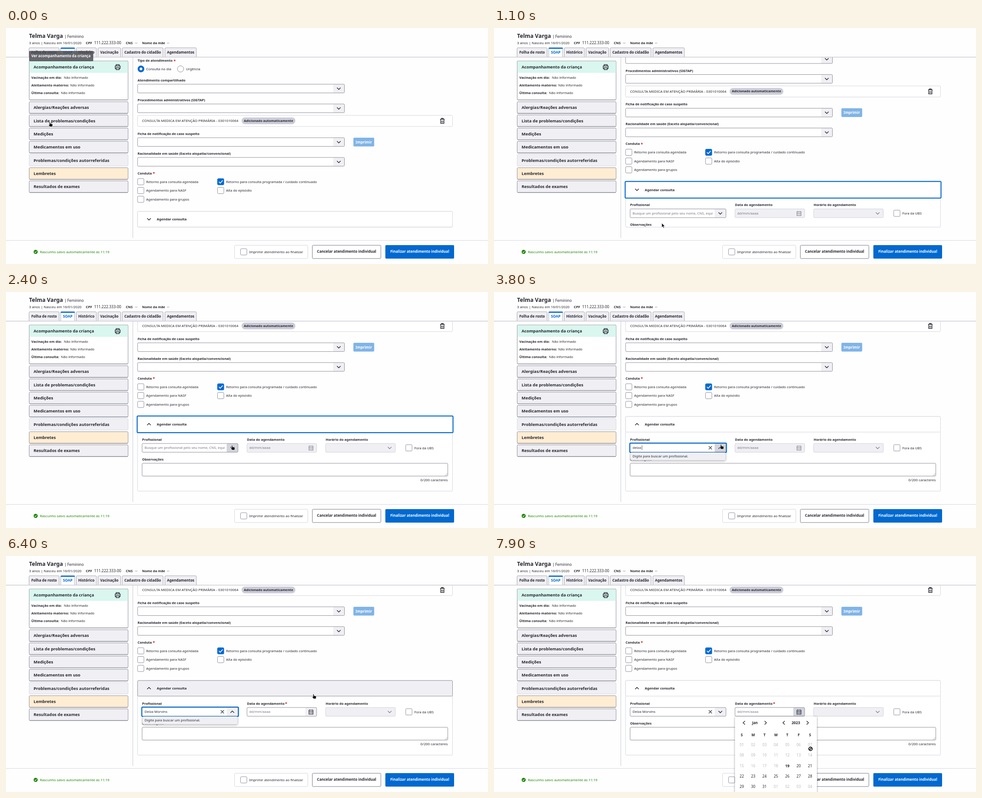
An HTML page that plays this animation: 1066 px wide and 525 px high, repeating every 8000 ms.

```html
<!DOCTYPE html>
<html lang="pt-BR">
<head>
<meta charset="utf-8">
<title>Atendimento</title>
<style>
html, body { margin: 0; width: 100%; height: 100%; overflow: hidden; background: #fefefe; }
svg { display: block; width: 100vw; height: 100vh; font-family: "Noto Sans", "Open Sans", sans-serif; }
.pop { filter: drop-shadow(0 1px 2px #0006); }
</style>
</head>
<body>
<svg id="stage" viewBox="0 0 1066 525"></svg>
<script>
const INK = '#25262e', LINE = '#8f909b', SOFT = '#d5d6e0', PALE = '#f0f0f4', BLUE = '#0069d0', MUTED = '#757681', RED = '#c8201d';
const LOOP = 8000, STEP = 100, SHIFT = 131;
const PRO = 'Delza Morvins', QUERY = 'delza';
const KEY_TIMES = [3200, 3400, 3500, 3600, 3800];

// time, x, y of the tip, pointer shape
const PATH = [
  [0, 97, 209, 'hand'], [100, 140, 250, 'arrow'], [500, 350, 461, 'arrow'], [600, 364, 458, 'arrow'],
  [700, 366, 443, 'arrow'], [800, 368, 435, 'hand'], [1000, 370, 434, 'hand'], [1100, 371, 434, 'arrow'],
  [1300, 372, 433, 'arrow'], [1800, 425, 365, 'arrow'], [2400, 500, 341, 'hand'], [2600, 502, 339, 'hand'],
  [6200, 502, 339, 'hand'], [6300, 600, 318, 'arrow'], [6400, 680, 307, 'hand'], [6600, 684, 322, 'arrow'],
  [6900, 677, 373, 'arrow'], [7100, 674, 346, 'hand'], [7700, 674, 346, 'hand'], [7800, 690, 400, 'arrow'], [7900, 700, 429, 'no']
];

const rect = (x, y, w, h, fill = '#fff', stroke = 'none', more = '') =>
  `<rect x="${x}" y="${y}" width="${w}" height="${h}" rx="2" fill="${fill}" stroke="${stroke}" ${more}/>`;
const path = (d, stroke = INK, width = 1.3, fill = 'none', more = '') =>
  `<path d="${d}" stroke="${stroke}" stroke-width="${width}" fill="${fill}" ${more}/>`;
const circle = (x, y, r, fill, stroke = 'none') =>
  `<circle cx="${x}" cy="${y}" r="${r}" fill="${fill}" stroke="${stroke}"/>`;
// y is the middle of the capitals
const text = (x, y, s, size = 7.5, color = INK, more = '') =>
  `<text x="${x}" y="${y + size * .357}" font-size="${size}" fill="${color}" ${more}>${s}</text>`;
const bold = (x, y, s, size = 7.45, color = INK, more = '') => text(x, y, s, size, color, 'font-weight="700" ' + more);
const MID = 'text-anchor="middle"';
const star = (x, y) => bold(x, y + 1, '*', 9, RED);

const chevron = (x, y, turn = 0, color = INK) =>
  path('M-4-2L0 2L4-2', color, 1.4, 'none', `transform="translate(${x} ${y}) rotate(${turn})"`);

function select(x, y, w, { off, open, hover } = {}) {
  const edge = off ? '#cfd0da' : LINE, right = x + w;
  return rect(x, y, w, 19.4, off ? PALE : '#fff') +
    (off ? '' : rect(right - 25, y, 25, 19.4, hover ? '#d3d4dd' : PALE)) +
    rect(x, y, w, 19.4, 'none', edge) +
    chevron(right - 12.5, y + 9.7, open ? 180 : 0, off ? '#85868f' : INK);
}

function check(x, y, label, on) {
  return rect(x, y - 7, 14, 14, on ? BLUE : '#fff', on ? BLUE : LINE) +
    (on ? path(`M${x + 3} ${y}l3 3l5.5-6`, '#fff', 1.7) : '') + text(x + 19, y + .3, label);
}

function calendarIcon(x, y, color) {
  return path(`M${x - 4.5} ${y - 4}h9v9h-9zM${x - 4.5} ${y - 1}h9M${x - 2.5} ${y - 5.5}v2M${x + 2.5} ${y - 5.5}v2`, color, 1.2) +
    path(`M${x - 2.8} ${y + 1}h6M${x - 2.8} ${y + 3}h6`, color, 1.1, 'none', 'stroke-dasharray="1.3 1"');
}

function header() {
  const tabs = [['Folha de rosto', 51, 66.5], ['SOAP', 121, 31], ['Histórico', 155.5, 44.5], ['Vacinação', 203.5, 50],
    ['Cadastro do cidadão', 257, 90.5], ['Agendamentos', 351.5, 69.5]];
  return path('M0 64.7H1066', '#cccdd6', 1.6) +
    bold(51, 18, 'Telma Varga', 12.2) + text(129, 19, '|', 8.3) + text(135.5, 19, 'Feminino', 8.35) +
    text(51, 33, '3 anos | Nasceu em 16/01/2020', 7.75) +
    bold(176.5, 33, 'CPF', 7.7) + text(195, 33, '111.222.333-00', 8.38) +
    bold(265, 33, 'CNS', 7.6) + text(285, 33, '—', 6) + bold(301, 33, 'Nome da mãe', 7.35) + text(355.5, 33, '—', 6) +
    tabs.map(([s, x, w], i) => {
      const on = i == 1;
      return path(`M${x} 64V46q0-2 2-2h${w - 4}q2 0 2 2V64`, '#a4a5af', 1, on ? '#fff' : PALE) +
        (on ? path(`M${x} 45h${w}`, BLUE, 2.6) : '') +
        bold(x + w / 2, 54, s, 8, on ? BLUE : INK, MID);
    }).join('');
}

function side() {
  const rows = ['Alergias/Reações adversas', 'Lista de problemas/condições', 'Medições', 'Medicamentos em uso',
    'Problemas/condições autorreferidas', 'Lembretes', 'Resultados de exames'];
  const facts = [['Vacinação em dia:', 128], ['Aleitamento materno:', 142], ['Última consulta:', 121.5]];
  return path('M280.5 65V467', '#c9cad5', 1) +
    rect(51.3, 74.5, 218.7, 86.5, '#b4b5bf') + rect(51.3, 73.3, 218.7, 86.5, '#fff', LINE) +
    rect(51.8, 73.8, 217.7, 26, '#d9f6ef') + bold(61, 87, 'Acompanhamento da criança', 9.15) +
    path('M243.5 84.5v-3h7v3M243.5 90h-2v-5.5h11v5.5h-2M243.5 88.5h7v4h-7z', INK, 1.3) +
    facts.map(([s, x], i) => bold(56, 110.5 + i * 16.7, s, 7.5) + text(x, 110.5 + i * 16.7, 'Não informado')).join('') +
    rows.map((s, i) => {
      const y = 164 + i * 29.35, off = i == 4;
      return (off ? '' : rect(51.3, y + 1.3, 218.7, 25.6, '#a9aab4')) +
        rect(51.3, y, 218.7, 25.6, i == 5 ? '#ffedd3' : PALE, off ? SOFT : LINE) + bold(61, y + 13, s, 9.23);
    }).join('');
}

function footer() {
  return rect(0, 472, 1066, 53, '#fefefe') + path('M0 472.6H1066', '#d6d7df', 1) +
    circle(65.6, 498, 4.5, '#1b8400') + path('M63.4 498l1.6 1.7l2.9-3.2', '#fff', 1.1) +
    text(75, 498, 'Rascunho salvo automaticamente às 11:19', 7.7, '#1b8400') +
    rect(505.5, 483.3, 162, 29.5, '#fff', SOFT) + check(518.7, 498, 'Imprimir atendimento ao finalizar') +
    rect(677.5, 483.3, 151.5, 29.5, '#fff', '#7b7c87') + bold(753.3, 497.5, 'Cancelar atendimento individual', 8, INK, MID) +
    rect(839, 483, 152, 30, BLUE) + bold(915, 497.5, 'Finalizar atendimento individual', 8, '#fff', MID);
}

function form() {
  return bold(291, 72.5, 'Tipo de atendimento') + star(370.5, 72.5) +
    circle(298.5, 91, 7.4, BLUE) + circle(298.5, 91, 3, '#fff') + text(310, 91.3, 'Consulta no dia', 7.6) +
    circle(386, 91, 7, '#fff', LINE) + text(398, 91.3, 'Urgência') +
    bold(291, 116.5, 'Atendimento compartilhado') + select(291, 125, 457.5) +
    bold(291, 160.5, 'Procedimentos administrativos (SIGTAP)') + select(291, 169, 457.5) +
    rect(291, 194.3, 696.5, 24.7, '#fff', SOFT) +
    text(301, 206.5, 'CONSULTA MEDICA EM ATENÇÃO PRIMÁRIA - 0301010064', 7.87) +
    `<rect x="521" y="199" width="119" height="15" rx="7.5" fill="#cccdd8"/>` +
    bold(580.5, 206.3, 'Adicionado automaticamente', 7.35, INK, MID) +
    path('M960 203h10M963 202.7v-1.7h4v1.7M961.3 204v8h7.4v-8M963.6 206v4M966.4 206v4', INK, 1.3) +
    bold(291, 235, 'Ficha de notificação de caso suspeito') + select(291, 244, 457.5) +
    rect(768.3, 244, 46, 19.4, '#80b4e7') + bold(791.3, 253.7, 'Imprimir', 8, '#fff', MID) +
    bold(291, 279, 'Racionalidade em saúde (Exceto alopatia/convencional)') + select(291, 288, 457.5) +
    bold(291, 323, 'Conduta') + star(324.5, 323) +
    check(291, 342, 'Retorno para consulta agendada') + check(291, 361.5, 'Agendamento para NASF') +
    check(291, 381, 'Agendamento para grupos') +
    check(467.8, 342, 'Retorno para consulta programada / cuidado continuado', true) + check(467.8, 361.5, 'Alta do episódio');
}

function results(t) {
  const fill = t < 5000 ? '#fff' : t < 5100 ? '#f5f5f8' : '#ededf2';
  return `<g class="pop">${rect(302, 357, 210, 57.5, fill)}</g>` +
    bold(306.5, 368, PRO + ' - 444.555.666-00', 7.9) +
    bold(306.5, 380, 'CBO', 7.6) + text(328.5, 380, 'MÉDICO DA ESTRATÉGIA DE SAÚDE DA FAMÍLIA', 7.8) +
    text(306.5, 391.8, '- 225142', 7.9) + bold(306.5, 404, 'Equipe') + text(338, 404, 'Sem equipe');
}

function booking(t) {
  const chosen = t >= 5600, dated = t >= 5700, focused = t >= 2500 && t < 7200;
  const typed = chosen ? PRO : QUERY.slice(0, KEY_TIMES.filter(k => t >= k).length);
  const caret = t >= 2500 && t < 3000 || t >= 3200 && t < 4300 || t >= 5000 && t < 5600;
  const caretX = 306.6 + [0, 4.5, 9, 11, 15, 20.6][typed.length];
  const open = focused && t >= 2600 && !(t >= 5600 && t < 5700);
  let s = bold(301, 328, 'Profissional') +
    select(301, 337, 212, { open, hover: t >= 2400 && t < 6300 }) +
    (typed ? text(306.5, 346.7, typed, 7.6) + path('M475 343l7 7M482 343l-7 7', '#3c3d46', 1.3)
      : focused ? '' : text(306.5, 346.7, 'Busque um profissional pelo seu nome, CNS, equi', 7.6, MUTED));
  if (focused) s += rect(300.2, 336, 214, 21, 'none', BLUE, 'stroke-width="2"');
  if (caret) s += path(`M${caretX} 341.5v10`, INK, .8);

  s += bold(533, 328, 'Data do agendamento') + (dated ? star(617, 328) : '') +
    rect(533, 337, 154, 19.4, dated ? '#fff' : PALE) +
    (dated ? rect(662, 337, 25, 19.4, t >= 7100 ? '#d3d4dd' : PALE) : '') +
    rect(533, 337, 154, 19.4, 'none', dated ? LINE : '#cfd0da') +
    text(538, 346.7, 'dd/mm/aaaa', 7.7, MUTED) + calendarIcon(674.5, 347, dated ? INK : '#85868f') +
    bold(707, 328, 'Horário do agendamento') + select(707, 337, 154, { off: true }) + check(884, 346.7, 'Fora da UBS') +
    bold(301, 372, 'Observações') + rect(301, 381, 676, 28.5, '#fff', LINE) + path('M971 408.5l5-5M974 408.5l2-2', LINE, .8) +
    text(977, 418, '0/200 caracteres', 7.8, INK, 'text-anchor="end"');

  if (open) s += t >= 4400 && t < 5600 ? results(t)
    : `<g class="pop">${rect(302, 357, 210, 17.5, PALE)}</g>` + text(306.5, 365.5, 'Digite para buscar um profissional.');
  return s;
}

function main(t) {
  const shift = t < 1100 ? 0 : t < 1200 ? SHIFT / 2 : SHIFT;
  const turn = t < 1200 ? 0 : t < 1300 ? 45 : t < 1400 ? 135 : 180;
  const y = 408 - shift;
  const hover = t >= 800 && t < 1100 || t >= 6300 && t < 6500;
  const ring = t >= 1000 && t < 2500;
  return `<clipPath id="view"><rect x="281" y="65" width="785" height="407"/></clipPath>
    <clipPath id="fold"><rect x="281" y="${y + 35}" width="785" height="${408 - y}"/></clipPath>
    <g clip-path="url(#view)"><g transform="translate(0 ${-shift})">${form()}</g>` +
    rect(291, y, 696.5, 443 - y, '#fff', SOFT) +
    rect(291, y, 696.5, 34.7, hover ? PALE : '#fff', hover ? LINE : SOFT) +
    (ring ? rect(290, y - 1.3, 698.7, 37.3, 'none', BLUE, 'stroke-width="2"') : '') +
    chevron(316.2, y + 17.3, turn) + bold(333.5, y + 17.6, 'Agendar consulta', 7.5) +
    (shift ? `<g clip-path="url(#fold)"><g transform="translate(0 ${SHIFT - shift})">${booking(t)}</g></g>` : '') + '</g>';
}

function calendar(t) {
  if (t < 7200) return '';
  const col = i => 548 + i * 25.17;
  let s = `<g opacity="${t < 7300 ? .5 : 1}"><g class="pop">${rect(533, 357, 181, 180)}</g>` +
    chevron(553, 371, 90) + bold(577, 371, 'Jan', 8, INK, MID) + chevron(600.5, 371, -90) +
    chevron(641, 371, 90) + bold(667.5, 371, '2023', 8.2, INK, MID) + chevron(693.5, 371, -90);
  [...'SMTWTFS'].forEach((d, i) => s += bold(col(i), 397.7, d, 8, INK, MID));
  for (let i = 0; i < 35; i++) {
    const day = String(i % 31 + 1).padStart(2, '0'), faded = i < 18 || i > 30;
    s += (i == 18 ? bold : text)(col(i % 7), 420.3 + Math.floor(i / 7) * 23.2, day, 8.3, faded ? '#b9bac2' : INK, MID);
  }
  return s + '</g>';
}

function tooltip(t) {
  if (t >= 200) return '';
  return `<g opacity="${t < 100 ? 1 : .4}">` + rect(51, 51, 142, 23, '#4b4b52', 'none', 'fill-opacity=".84"') +
    bold(56, 62, 'Ver acompanhamento da criança', 7.95, '#fff') + '</g>';
}

const SHAPES = {
  arrow: path('M0 0V9.6L2.3 7.5L3.9 11.2L5.5 10.5L3.9 6.9H7z', '#fff', .7, '#111'),
  hand: path('M-1 1q0-1 1-1t1 1v2.6l4 .8q1.2.3 1.1 1.6l-.5 4.6H.2L-2.6 7.2q-.5-1 .6-1.2l1 .6z', '#fff', .6, '#111'),
  no: circle(0, 0, 4.4, '#ddd', '#fff') + circle(0, 0, 4, '#ccc', '#111') + path('M-2.8 2.8L2.8-2.8', '#111', 1.6) +
    path('M-4 0a4 4 0 1 0 8 0a4 4 0 1 0-8 0', '#111', 1.5)
};

function pointer(t) {
  const i = PATH.findLastIndex(p => p[0] <= t), [t0, x0, y0, shape] = PATH[i];
  const [t1, x1, y1] = PATH[i + 1] || [t0 + 1, x0, y0];
  const k = Math.min(1, (t - t0) / (t1 - t0));
  return `<g transform="translate(${x0 + (x1 - x0) * k} ${y0 + (y1 - y0) * k})">${SHAPES[shape]}</g>`;
}

const stage = document.getElementById('stage'), still = header() + side() + footer();
const start = performance.now();
let shown = -1;

function tick() {
  const t = Math.floor((performance.now() - start) % LOOP / STEP) * STEP;
  if (t != shown) {
    stage.innerHTML = main(t) + still + calendar(t) + tooltip(t) + pointer(t);
    shown = t;
  }
  requestAnimationFrame(tick);
}
tick();
</script>
</body>
</html>
```
